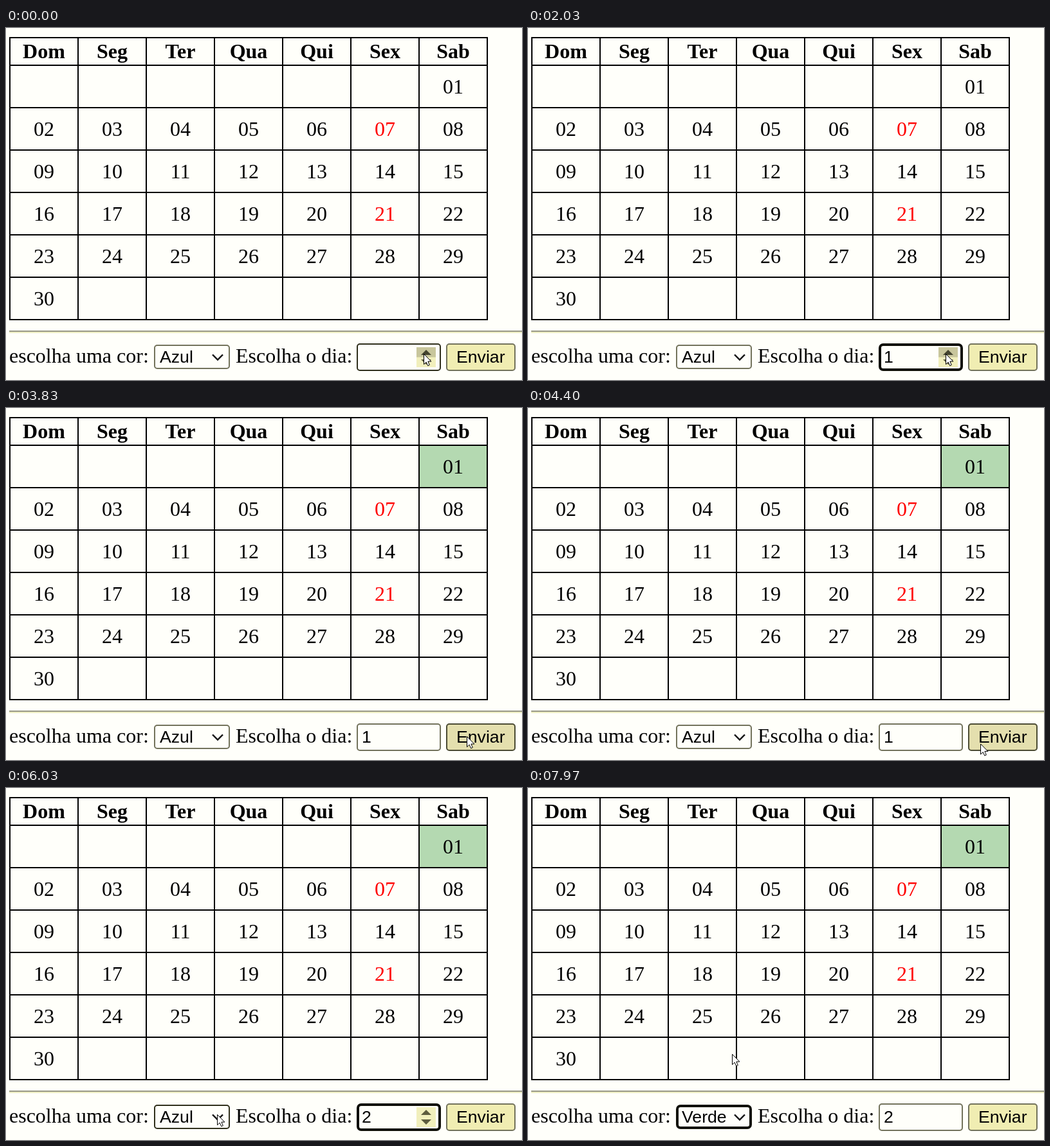
Recreate the animation shown at these times as an HTML page. Size 802 px wide and 548 px high, loop 8000 ms.

```html
<!DOCTYPE html>
<html lang="pt">
<head>
<meta charset="utf-8">
<title>Calendário</title>
<style>
  html, body { margin: 0; width: 100%; height: 100%; overflow: hidden; background: #fffffa; }
  svg { display: block; }
  text { white-space: pre; }
  .serif { font: 32px "Liberation Serif", serif; }
  .bold { font-weight: bold; text-anchor: middle; }
  .day { text-anchor: middle; }
  .sans { font: 26.667px "Liberation Sans", sans-serif; }
  .popup { filter: drop-shadow(0 2px 9px rgba(135, 130, 0, .42)); }
</style>
</head>
<body>
<svg width="802" height="548" viewBox="0 0 802 548">
  <g id="calendar"></g>
  <g id="form"></g>
</svg>
<script>
const LOOP = 8000;
const CLICK = { firstDay: 430, send: 3380, secondDay: 5050, open: 6230, pick: 7620 };
const OPTIONS = ["Azul", "Verde", "Rosa", "Roxo"];
const BORDER = "#73735c", DARK = "#30301c";

// Pointer stops: time, x, y
const STOPS = [
  [0, 649, 507], [2450, 649, 507], [2950, 716, 511], [4230, 716, 511],
  [4480, 699, 526], [4820, 653, 507], [5350, 653, 507], [5880, 328, 508],
  [6330, 328, 508], [6730, 317, 421], [7480, 317, 421], [7600, 317, 414], [LOOP, 317, 414]
];

const text = (x, y, value, cls, fill = "#000") =>
  `<text x="${x}" y="${y}" class="${cls}" fill="${fill}">${value}</text>`;

const rect = (x, y, w, h, fill, extra = "") =>
  `<rect x="${x}" y="${y}" width="${w}" height="${h}" fill="${fill}" ${extra}/>`;

// Box whose border lies wholly inside the given bounds
const box = (x, y, w, h, fill, stroke, line = 2) =>
  rect(x + line / 2, y + line / 2, w - line, h - line, fill,
    `rx="${line > 2 ? 5 : 4}" stroke="${stroke}" stroke-width="${line}"`);

const path = (d, fill, extra = "") => `<path d="${d}" fill="${fill}" ${extra}/>`;

const inside = (p, x, y, w, h) => p.x >= x && p.x < x + w && p.y >= y && p.y < y + h;

function pointerAt(t) {
  const i = STOPS.findIndex(stop => stop[0] > t);
  const [t0, x0, y0] = STOPS[i - 1], [t1, x1, y1] = STOPS[i];
  const k = (t - t0) / (t1 - t0), ease = k * k * (3 - 2 * k);
  return { x: x0 + (x1 - x0) * ease, y: y0 + (y1 - y0) * ease };
}

function drawCalendar() {
  const left = 6, cell = 106, top = 58, row = 66;
  let grid = "";
  for (let i = 0; i < 8; i++) {
    const x = left + i * cell, y = i ? top + (i - 1) * row : 15;
    grid += `M${x} 14V455M5 ${y}H749`;
  }
  let out = rect(642, 58, 106, 66, "#b4d9b1", 'id="marked"') +
    path(grid, "none", 'stroke="#000" stroke-width="2"');
  ["Dom", "Seg", "Ter", "Qua", "Qui", "Sex", "Sab"].forEach((name, i) => {
    out += text(left + cell * (i + .5), 47, name, "serif bold");
  });
  for (let day = 1; day <= 30; day++) {
    const slot = day + 5;
    out += text(left + cell * (slot % 7 + .5), 102 + row * Math.floor(slot / 7),
      String(day).padStart(2, "0"), "serif day", day === 7 || day === 21 ? "#f00" : "#000");
  }
  out += rect(5, 471, 797, 2, "#999987") + rect(5, 473, 797, 2, "#efefc4");
  out += text(5, 521, "escolha uma cor:", "serif") + text(357, 521, "Escolha o dia:", "serif");
  document.getElementById("calendar").innerHTML = out;
}

function selectBox(t, p, open) {
  const picked = t >= CLICK.pick;
  const hover = open || inside(p, 230, 493, 118, 38);
  return box(230, 493, 118, 38, open ? "#fbfbe8" : "#fffffa",
      picked ? "#111108" : hover ? DARK : BORDER, picked ? 4 : 2) +
    text(239, 521, OPTIONS[picked ? 1 : 0], "sans") +
    path("M321 508.5L329 516.5L337 508.5", "none", 'stroke="#111" stroke-width="2.4"');
}

function dayInput(t, p) {
  const first = t >= CLICK.firstDay && t < CLICK.send;
  const second = t >= CLICK.secondDay && t < CLICK.open;
  const focused = first || second;
  const hover = inside(p, 545, 491, 130, 42);
  const value = t < CLICK.firstDay ? "" : t < CLICK.secondDay ? "1" : "2";
  let out = focused ? box(545, 491, 131, 43, "#fffffa", "#0c0c04", 4)
    : box(545, 491, 131, 43, "#fffffa", hover ? DARK : BORDER);
  out += text(553, 521, value, "sans");
  const sinceClick = t - (second ? CLICK.secondDay : CLICK.firstDay);
  if (focused && sinceClick % 1000 < 500) out += rect(567, 498, 1.5, 29, "#000");
  if (focused || hover) {
    const over = inside(p, 638, 497, 30, 31);
    out += rect(638, 497, 30, 31, "#f1efbc");
    if (over) out += rect(638, 497, 30, 15.5, "#c8c69c");
    out += path("M645 509L653 501L661 509Z", over ? "#44442f" : "#5d5c3e") +
      path("M645 516L653 524L661 516Z", "#5d5c3e");
  }
  return out;
}

function sendButton(t, p) {
  const hover = inside(p, 684, 491, 108, 43);
  const pressed = t >= CLICK.send - 90 && t < CLICK.send;
  return box(684, 491, 108, 43, pressed ? "#f6f4c8" : hover ? "#e4dfae" : "#f0edb2",
    hover ? "#4c4c34" : BORDER) + text(700, 521, "Enviar", "sans");
}

function popup(p) {
  const active = p.y > 492 ? 0 : Math.max(0, Math.min(3, Math.floor((p.y - 358) / 33.5)));
  let out = rect(230.5, 357.5, 117, 135, "#fffffc", 'rx="6" stroke="#c9c9ae" class="popup"');
  out += rect(231, 391 + (active - 1) * 33.4, 116, 34, "#1e68aa", active % 3 ? "" : 'rx="5"');
  OPTIONS.forEach((name, i) => {
    out += text(239, 382 + i * 33.4, name, "sans", i === active ? "#fff" : "#000");
  });
  return out;
}

const pointer = p => path("M0 0V16.2L3.7 12.7L6.2 18.3L8.8 17.1L6.4 11.6H11.4Z", "#fff",
  `stroke="#000" stroke-width="1" transform="translate(${p.x + .5} ${p.y + .5})"`);

function draw() {
  const t = performance.now() % LOOP;
  const p = pointerAt(t);
  const open = t >= CLICK.open && t < CLICK.pick;
  document.getElementById("marked").style.display = t >= CLICK.send ? "" : "none";
  document.getElementById("form").innerHTML =
    selectBox(t, p, open) + dayInput(t, p) + sendButton(t, p) + (open ? popup(p) : "") + pointer(p);
  requestAnimationFrame(draw);
}

drawCalendar();
draw();
</script>
</body>
</html>
```
